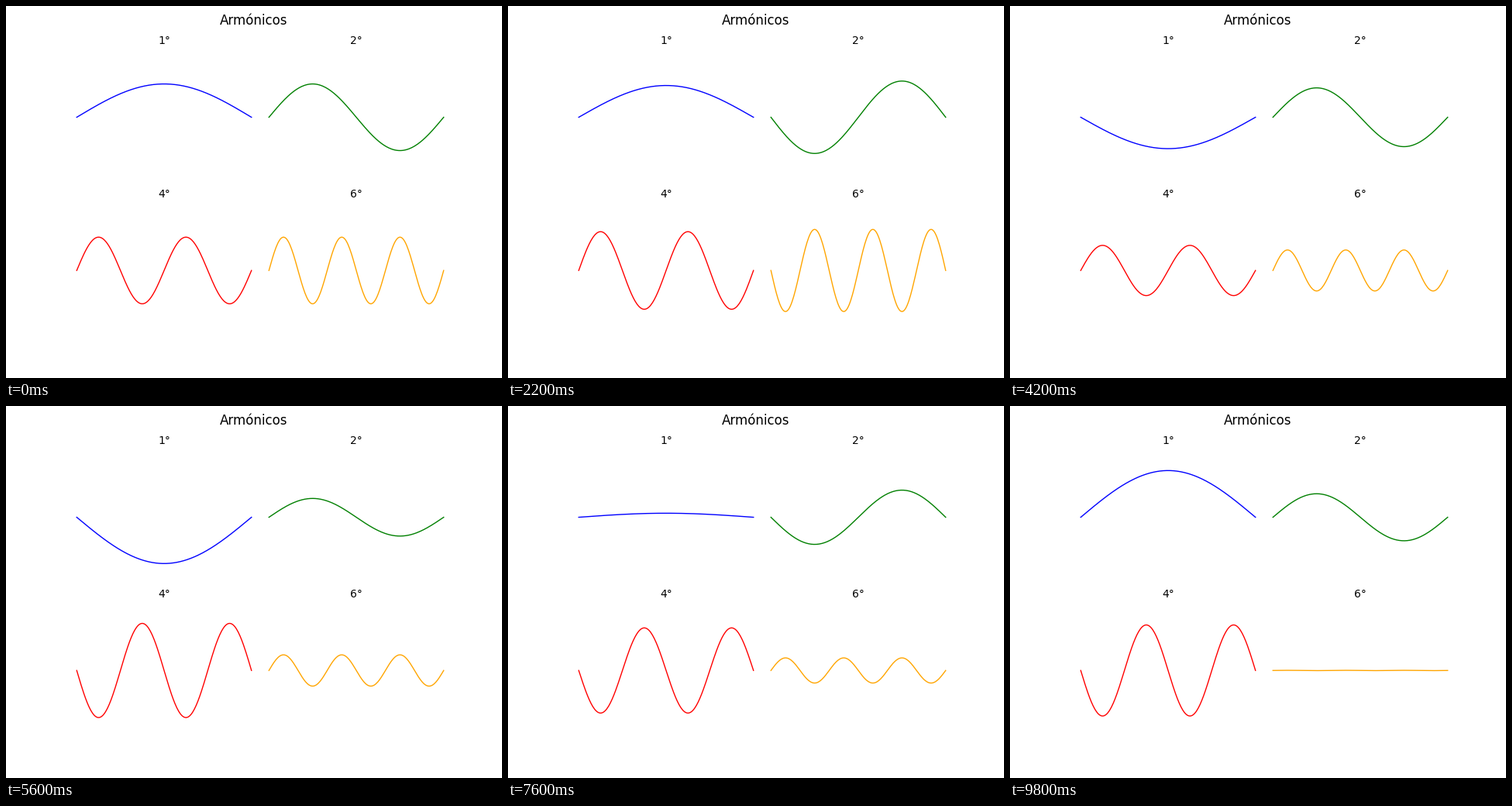
Recreate the animation shown at these times as a matplotlib script. Size 640 by 480 pixels, loop 10 s.

```python
import numpy as np
import matplotlib.pyplot as plt
from matplotlib.animation import FuncAnimation

FRAMES = 50
INTERVAL = 200
SPAN = 7.2  # phase of the first harmonic on the last frame

plt.rcParams["font.family"] = "DejaVu Sans"

modes = [1, 2, 4, 6]
colors = ["blue", "green", "red", "orange"]
x = np.linspace(0, 1, 200)
phases = np.linspace(0, SPAN, FRAMES)


def wave(n, phase):
    """Standing wave of the n-th harmonic on a string with fixed ends."""
    return (np.cos(n * phase) + np.sin(n * phase)) * np.sin(n * np.pi * x)


fig, axes = plt.subplots(2, 2, figsize=(6.4, 4.8), dpi=100)
fig.subplots_adjust(left=0.125, right=0.9, bottom=0.11, top=0.88,
                    wspace=0, hspace=0.15)
fig.suptitle("Armónicos", fontsize=12)

lines = []
for ax, n, color in zip(axes.flat, modes, colors):
    line, = ax.plot(x, wave(n, 0), color=color, lw=1)
    ax.set_xlim(-0.05, 1.05)
    ax.set_ylim(-2, 2)
    ax.set_title(f"{n}°", fontsize=10)
    ax.axis("off")
    lines.append(line)


def update(i):
    for line, n in zip(lines, modes):
        line.set_ydata(wave(n, phases[i]))
    return lines


anim = FuncAnimation(fig, update, frames=FRAMES, interval=INTERVAL,
                     repeat=True, repeat_delay=0)
plt.show()
```
